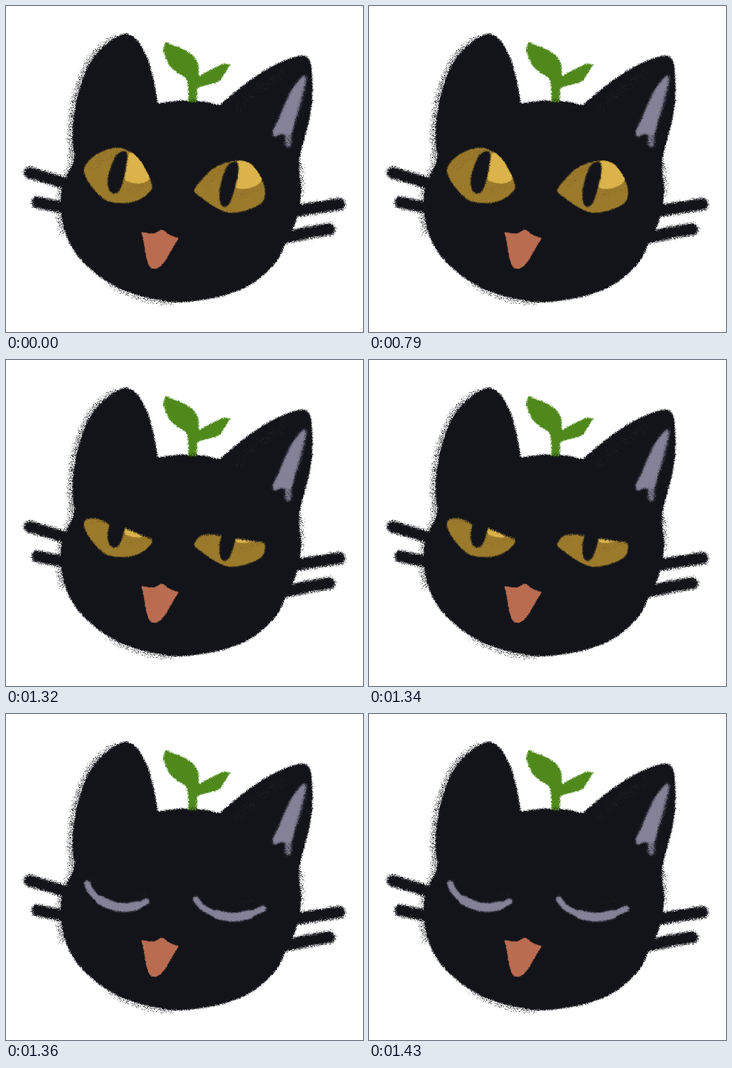
Animation, 770 px wide and 704 px high, one loop 1.48 s. Source, as an HTML page with a canvas:

```html
<!DOCTYPE html>
<html lang="en">
<head>
<meta charset="utf-8">
<title>Blinking cat</title>
<style>
html, body { margin: 0; width: 100%; height: 100%; overflow: hidden; background: #fff; }
canvas { display: block; }
</style>
</head>
<body>
<canvas id="stage" width="770" height="704"></canvas>
<script>
const W = 770, H = 704, LOOP = 1480;
const FUR = '#13141a', GREEN = '#4f891c', EYE = '#9c7a2b', GLINT = '#dbb34a',
  LILAC = '#858298', CORAL = '#ba6c50';

// Brush presets: edge blur, grain amount, edge hardness
const CRAYON = { blur: 1.7, grain: 0.95, hard: 20 };
const CHALK = { blur: 2, grain: 0.6, hard: 3 };
const DUST = { blur: 4, grain: 0.95, hard: 20 };
const SMUDGE = { blur: 3.2, grain: 0.55, hard: 2.3 };

const newCanvas = () => Object.assign(document.createElement('canvas'), { width: W, height: H });
const layer = newCanvas().getContext('2d', { willReadFrequently: true });

let seed = 1;
function rand() {
  seed = (seed + 0x6D2B79F5) | 0;
  let t = Math.imul(seed ^ (seed >>> 15), 1 | seed);
  t = (t + Math.imul(t ^ (t >>> 7), 61 | t)) ^ t;
  return ((t ^ (t >>> 14)) >>> 0) / 4294967296;
}

// Catmull-Rom curve through [x, y, x, y, ...]; a doubled point is a corner
function curve(list, closed) {
  const n = list.length / 2, path = new Path2D();
  const at = i => {
    const k = closed ? (i + n) % n : Math.max(0, Math.min(n - 1, i));
    return [list[2 * k], list[2 * k + 1]];
  };
  path.moveTo(...at(0));
  for (let i = 0; i < (closed ? n : n - 1); i++) {
    const [a, b, c, d] = [at(i - 1), at(i), at(i + 1), at(i + 2)];
    path.bezierCurveTo(b[0] + (c[0] - a[0]) / 6, b[1] + (c[1] - a[1]) / 6,
      c[0] - (d[0] - b[0]) / 6, c[1] - (d[1] - b[1]) / 6, c[0], c[1]);
  }
  return path;
}

// Draws on the scratch layer, breaks its edge into grain, lays it on ctx
function grainy(ctx, color, brush, draw) {
  layer.clearRect(0, 0, W, H);
  layer.save();
  layer.filter = `blur(${brush.blur}px)`;
  layer.fillStyle = layer.strokeStyle = color;
  layer.lineCap = layer.lineJoin = 'round';
  draw(layer);
  layer.restore();
  const img = layer.getImageData(0, 0, W, H), px = img.data;
  const rgb = [1, 3, 5].map(i => parseInt(color.slice(i, i + 2), 16));
  for (let i = 0; i < px.length; i += 4) {
    if (!px[i + 3]) continue;
    const a = px[i + 3] / 255 - 0.5 + (rand() - 0.5) * brush.grain;
    px[i] = rgb[0]; px[i + 1] = rgb[1]; px[i + 2] = rgb[2];
    px[i + 3] = 255 * Math.max(0, Math.min(1, a * brush.hard + 0.5));
  }
  layer.putImageData(img, 0, 0);
  ctx.drawImage(layer.canvas, 0, 0);
}

const blob = (ctx, color, brush, list) =>
  grainy(ctx, color, brush, c => c.fill(curve(list, true)));

const line = (ctx, color, brush, width, list, alpha = 1) =>
  grainy(ctx, color, brush, c => {
    c.globalAlpha = alpha;
    c.lineWidth = width;
    c.stroke(curve(list, false));
  });

const head = [
  260, 60, 277, 68, 292, 86, 306, 116, 316, 150, 323, 185, 328, 211, 328, 211,
  345, 208, 380, 204, 420, 206, 445, 210, 461, 214, 461, 214,
  490, 189, 520, 165, 560, 138, 600, 118, 638, 107, 652, 113, 659, 136, 661, 190,
  656, 236, 645, 282, 633, 332, 634, 370, 637, 400, 633, 432, 626, 462, 616, 488,
  602, 515, 588, 545, 564, 573, 530, 600, 490, 619, 440, 632, 372, 640, 310, 631,
  250, 612, 200, 583, 160, 546, 136, 510, 123, 472, 118, 440, 119, 402, 131, 366,
  147, 330, 143, 290, 146, 240, 155, 190, 172, 140, 196, 102, 226, 75, 246, 63
];

function drawHead(c) {
  c.fillStyle = '#fff';
  c.fillRect(0, 0, W, H);
  blob(c, FUR, CRAYON, head);

  // Whiskers
  const hair = { ...CRAYON, blur: 2.6 };
  line(c, FUR, hair, 25, [51, 360, 92, 372, 140, 387]);
  line(c, FUR, hair, 25, [68, 424, 100, 431, 140, 436]);
  line(c, FUR, hair, 26, [719, 428, 680, 434, 620, 443]);
  line(c, FUR, hair, 26, [697, 482, 655, 489, 605, 499]);

  // Loose crayon dust along the outline
  line(c, FUR, DUST, 10, [236, 69, 195, 99, 168, 140, 151, 190, 141, 245, 139, 290, 143, 325], 0.45);
  line(c, FUR, DUST, 12, [143, 325, 133, 358, 119, 392, 115, 440, 120, 490], 0.3);
  line(c, FUR, DUST, 8, [220, 600, 260, 618, 310, 635, 360, 640], 0.4);
  line(c, FUR, DUST, 10, [634, 340, 637, 380, 636, 410], 0.3);

  // Ears
  line(c, '#2b2c32', DUST, 22, [500, 222, 545, 180, 600, 143], 0.1);
  blob(c, LILAC, SMUDGE, [
    640, 152, 645, 162, 636, 198, 626, 235, 618, 270, 606, 279, 594, 276, 580, 283,
    575, 271, 587, 246, 602, 211, 618, 178
  ]);
  line(c, LILAC, SMUDGE, 17, [610, 260, 609, 282, 609, 298], 0.66);
  line(c, LILAC, SMUDGE, 14, [643, 155, 638, 182, 624, 235], 0.6);

  // Sprout
  blob(c, GREEN, { ...CRAYON, blur: 1.4 }, [
    346, 79, 340, 92, 343, 108, 353, 129, 369, 144, 388, 156, 392, 172, 393, 190,
    393, 207, 393, 207, 411, 208, 411, 208, 412, 190, 414, 177, 437, 170, 458, 163,
    470, 149, 483, 127, 483, 127, 470, 125, 445, 136, 416, 151, 416, 151,
    414, 126, 403, 107, 380, 92, 358, 84
  ]);
  line(c, FUR, DUST, 5, [394, 208, 410, 209], 0.7);

  // Mouth
  blob(c, CORAL, { ...CHALK, blur: 1.6, hard: 4 }, [
    292, 488, 292, 488, 318, 491, 337, 483, 352, 494, 373, 501, 373, 501, 360, 522,
    344, 549, 332, 563, 320, 568, 308, 560, 301, 535, 297, 510
  ]);
}

function drawEyes(c) {
  blob(c, EYE, CHALK, [
    168, 354, 178, 335, 205, 315, 238, 306, 262, 312, 285, 330, 303, 358, 315, 390,
    304, 407, 280, 421, 250, 426, 217, 420, 192, 399, 175, 375
  ]);
  blob(c, EYE, CHALK, [
    406, 398, 420, 378, 442, 355, 470, 340, 500, 334, 526, 340, 545, 362, 557, 390,
    558, 412, 548, 428, 522, 440, 488, 447, 462, 440, 435, 424, 413, 407
  ]);
  // Worn grain on the irises
  line(c, '#806426', DUST, 22, [186, 346, 210, 328, 240, 320], 0.17);
  line(c, '#806426', DUST, 22, [430, 385, 455, 360, 475, 350], 0.17);
  line(c, '#806426', DUST, 20, [262, 398, 300, 388], 0.15);
  line(c, '#806426', DUST, 20, [505, 408, 545, 396], 0.15);

  blob(c, GLINT, { ...CHALK, blur: 1.6 }, [
    272, 317, 288, 332, 300, 352, 309, 373, 290, 383, 266, 380, 255, 371, 258, 346, 264, 323
  ]);
  blob(c, GLINT, { ...CHALK, blur: 1.6 }, [
    500, 335, 524, 339, 541, 356, 551, 376, 535, 390, 512, 395, 494, 389, 499, 356
  ]);

  const pupil = { ...CHALK, blur: 2.4 };
  blob(c, FUR, pupil, [
    253, 313, 262, 320, 259, 348, 253, 378, 244, 400, 233, 405, 222, 397, 219, 376, 225, 350, 238, 322
  ]);
  blob(c, FUR, pupil, [
    491, 336, 501, 342, 500, 366, 493, 396, 484, 423, 473, 434, 463, 428, 460, 405, 465, 376, 477, 346
  ]);
}

function drawLids(c) {
  const lid = { ...CHALK, blur: 2.4, grain: 0.8, hard: 5 };
  blob(c, FUR, lid, [
    158, 347, 158, 347, 170, 345, 187, 342, 205, 346, 222, 354, 250, 361, 275, 371,
    298, 381, 322, 389, 322, 389, 312, 335, 265, 298, 200, 298, 160, 325
  ]);
  blob(c, FUR, lid, [
    398, 391, 398, 391, 410, 383, 430, 377, 462, 379, 492, 385, 525, 390, 566, 396,
    566, 396, 556, 350, 515, 322, 450, 330, 405, 370
  ]);
}

function drawClosed(c) {
  const arcs = [
    [175, 366, 184, 384, 203, 402, 230, 414, 256, 418, 283, 414, 303, 405],
    [409, 400, 426, 419, 455, 433, 490, 439, 525, 433, 555, 420]
  ];
  for (const arc of arcs) {
    line(c, LILAC, { ...SMUDGE, blur: 2.6 }, 13, arc);
    line(c, LILAC, { ...SMUDGE, blur: 2.6 }, 19, arc.slice(4, -2));
  }
  line(c, '#2c2718', DUST, 14, [185, 362, 205, 353], 0.1);
  line(c, '#2c2718', DUST, 12, [285, 392, 300, 390], 0.12);
  line(c, '#2c2718', DUST, 16, [508, 410, 532, 400], 0.12);
}

function pose(base, ...parts) {
  const c = newCanvas().getContext('2d');
  if (base) c.drawImage(base, 0, 0);
  parts.forEach(part => part(c));
  return c.canvas;
}

const face = pose(null, drawHead);
const open = pose(face, drawEyes);
const half = pose(open, drawLids);
const shut = pose(face, drawClosed);

const stage = document.getElementById('stage').getContext('2d');
function tick() {
  const t = performance.now() % LOOP;
  stage.drawImage(t < 1320 ? open : t < 1360 ? half : shut, 0, 0);
  requestAnimationFrame(tick);
}
tick();
</script>
</body>
</html>
```
